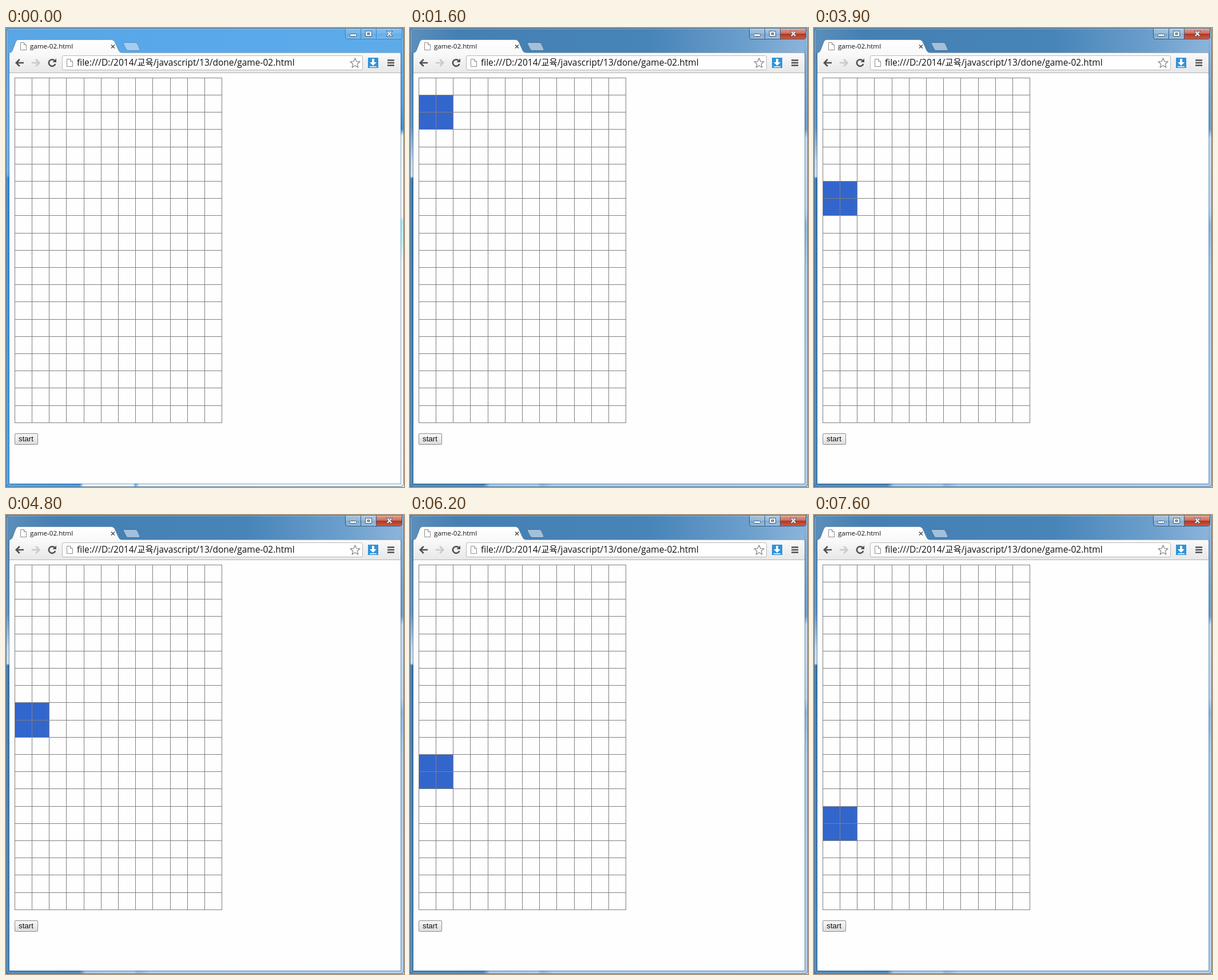
Animation of 696 by 804 pixels, one loop 8 s. Source, as an HTML page:

```html
<!DOCTYPE html>
<html lang="ko">
<head>
<meta charset="utf-8">
<title>Falling block</title>
<style>
html, body { margin: 0; width: 100%; height: 100%; overflow: hidden; background: #fff; }
svg { display: block; width: 696px; height: 804px; }
text { font-family: "Open Sans", "Noto Sans CJK KR", "Noto Sans CJK", sans-serif; fill: #111; white-space: pre; }
#active, #block { opacity: 0; }
.sharp { shape-rendering: crispEdges; }
</style>
</head>
<body>
<svg viewBox="0 0 696 804">
  <defs>
    <linearGradient id="topOff"><stop offset="0" stop-color="#5ba6e4"/><stop offset=".4" stop-color="#58a8ea"/><stop offset="1" stop-color="#5eabea"/></linearGradient>
    <linearGradient id="topOn"><stop offset="0" stop-color="#5c8fbb"/><stop offset=".12" stop-color="#4580b3"/><stop offset=".6" stop-color="#4784b8"/><stop offset=".85" stop-color="#6c9fcc"/><stop offset="1" stop-color="#8db5dc"/></linearGradient>
    <linearGradient id="leftOff" x2="0" y2="1"><stop offset="0" stop-color="#5ba8e8"/><stop offset=".28" stop-color="#66b0ea"/><stop offset=".29" stop-color="#2f86d6"/><stop offset="1" stop-color="#4a9ee4"/></linearGradient>
    <linearGradient id="leftOn" x2="0" y2="1"><stop offset="0" stop-color="#5088b8"/><stop offset=".17" stop-color="#5a8fbd"/><stop offset=".25" stop-color="#c3d6e8"/><stop offset=".285" stop-color="#cfdeec"/><stop offset=".29" stop-color="#3873a9"/><stop offset="1" stop-color="#4583b9"/></linearGradient>
    <linearGradient id="rightOff" x2="0" y2="1"><stop offset="0" stop-color="#5eabea"/><stop offset=".16" stop-color="#4a9de2"/><stop offset=".22" stop-color="#2e86d8"/><stop offset=".235" stop-color="#e9f5fd"/><stop offset=".41" stop-color="#f2f9fe"/><stop offset=".42" stop-color="#a5eafa"/><stop offset=".47" stop-color="#b9eefa"/><stop offset=".51" stop-color="#eff9fe"/><stop offset="1" stop-color="#eef6fc"/></linearGradient>
    <linearGradient id="rightOn" x2="0" y2="1"><stop offset="0" stop-color="#8db5dc"/><stop offset=".16" stop-color="#6b9fcc"/><stop offset=".22" stop-color="#659ac8"/><stop offset=".24" stop-color="#c1d8ee"/><stop offset=".4" stop-color="#b4d1ed"/><stop offset=".43" stop-color="#86b6df"/><stop offset=".53" stop-color="#a6c9ea"/><stop offset="1" stop-color="#a9cbec"/></linearGradient>
    <linearGradient id="footOff"><stop offset="0" stop-color="#4a9ee4"/><stop offset=".185" stop-color="#3d94df"/><stop offset=".195" stop-color="#eef7fd"/><stop offset=".32" stop-color="#eef7fd"/><stop offset=".325" stop-color="#55aae8"/><stop offset=".335" stop-color="#e6f3fc"/><stop offset="1" stop-color="#eef6fc"/></linearGradient>
    <linearGradient id="footOn"><stop offset="0" stop-color="#4583b9"/><stop offset=".185" stop-color="#4280b7"/><stop offset=".2" stop-color="#9fc4e8"/><stop offset=".32" stop-color="#a6c9ea"/><stop offset=".33" stop-color="#84b3de"/><stop offset=".36" stop-color="#a6c9ea"/><stop offset="1" stop-color="#a9cbec"/></linearGradient>
    <linearGradient id="bar" x2="0" y2="1"><stop offset="0" stop-color="#fafafa"/><stop offset="1" stop-color="#e7e7e7"/></linearGradient>
    <linearGradient id="tabFill" x2="0" y2="1"><stop offset="0" stop-color="#fff"/><stop offset="1" stop-color="#f9f9f9"/></linearGradient>
    <linearGradient id="glass" x2="0" y2="1"><stop offset="0" stop-color="#fff" stop-opacity=".38"/><stop offset=".48" stop-color="#fff" stop-opacity=".24"/><stop offset=".5" stop-color="#fff" stop-opacity=".06"/><stop offset="1" stop-color="#fff" stop-opacity=".24"/></linearGradient>
    <linearGradient id="red" x2="0" y2="1"><stop offset="0" stop-color="#dba197"/><stop offset=".47" stop-color="#cb6f60"/><stop offset=".5" stop-color="#b43420"/><stop offset="1" stop-color="#cf5a3c"/></linearGradient>
    <linearGradient id="btn" x2="0" y2="1"><stop offset="0" stop-color="#f7f7f7"/><stop offset=".4" stop-color="#eee"/><stop offset="1" stop-color="#dcdcdc"/></linearGradient>
    <g id="sheet" fill="#fff" stroke="#8c8c8c"><path d="M.5.5H6.5L10.5 4.5V13.5H.5Z"/><path d="M6.5.5V4.5H10.5" fill="#eee"/></g>
    <path id="newTab" d="M207 25.500H226Q229 25.500 230 28L234 37Q234.500 39.500 232 39.500H214Q211 39.500 210 37L205.500 28Q204.500 25.500 207 25.500Z"/>
    <path id="caption" d="M593.500 0V16Q593.500 19.500 597 19.500H688Q692.500 19.500 692.500 16V0M620.500 0V19M647.500 0V19" fill="none"/>
  </defs>

  <g id="idle">
    <rect width="696" height="80" fill="url(#topOff)"/>
    <rect y="43" width="7" height="761" fill="url(#leftOff)"/>
    <rect x="689" width="7" height="804" fill="url(#rightOff)"/>
    <rect y="797" width="696" height="7" fill="url(#footOff)"/>
    <use href="#newTab" fill="#a5cdf0" stroke="#5391c6"/>
    <rect x="594" y="1" width="98" height="18" fill="url(#glass)" opacity=".6"/>
    <use href="#caption" stroke="#4683b9"/>
  </g>
  <g id="active">
    <rect width="696" height="80" fill="url(#topOn)"/>
    <rect y="43" width="7" height="761" fill="url(#leftOn)"/>
    <rect x="689" width="7" height="804" fill="url(#rightOn)"/>
    <rect y="797" width="696" height="7" fill="url(#footOn)"/>
    <use href="#newTab" fill="#a3c0da" stroke="#41719c"/>
    <rect x="594" y="1" width="53" height="18" fill="url(#glass)"/>
    <path d="M648 1H692V16Q692 19 688 19H648Z" fill="url(#red)"/>
    <use href="#caption" stroke="#365b7e"/>
  </g>

  <!-- window edge -->
  <g fill="none">
    <rect x="1.500" y="1.500" width="693" height="801" rx="5" stroke="#fff" stroke-opacity=".4"/>
    <rect x=".5" y=".5" width="695" height="803" rx="6" stroke="#2b4a66" stroke-opacity=".75"/>
    <path d="M5.500 44V798.500H690.500V44" stroke="#38648c" stroke-opacity=".55"/>
  </g>

  <!-- caption icons -->
  <g fill="#fff" stroke="#4b5968">
    <rect x="601.500" y="10.500" width="11" height="4" rx="1"/>
    <path fill-rule="evenodd" d="M628.500 5.500H639.500V14.500H628.500ZM632 8.500H636V11.500H632Z"/>
    <path d="M665 5.500H668.500L670.500 8L672.500 5.500H676L672.500 9.800L676 14.500H672.500L670.500 11.800L668.500 14.500H665L668.500 9.800Z"/>
  </g>

  <!-- page and toolbar -->
  <rect x="6" y="78" width="684" height="720" fill="#fefefe"/>
  <path d="M6 79V46Q6 43 9 43H687Q690 43 690 46V79Z" fill="url(#bar)"/>
  <path class="sharp" d="M6 78.500H690" stroke="#b3b3b3"/>
  <path d="M6 43.500Q10 43 11.500 39L17 24.500Q18.500 20.500 22 20.500H184Q188 20.500 190 24L197 39.500Q199 43.500 204 43.500V45H6Z" fill="url(#tabFill)"/>
  <path d="M6 43.500Q10 43 11.500 39L17 24.500Q18.500 20.500 22 20.500H184Q188 20.500 190 24L197 39.500Q199 43.500 204 43.500H690" fill="none" stroke="#35587a" stroke-opacity=".45"/>
  <use href="#sheet" x="25" y="25"/>
  <text x="42" y="36" font-size="11.600">game-02.html</text>
  <path d="M184 29.500L190 35.500M190 29.500L184 35.500" stroke="#555" stroke-width="1.700"/>

  <g fill="none" stroke-width="2.600">
    <path id="back" d="M31 61H18.500M23.800 55L17.800 61L23.800 67" stroke="#505050"/>
    <path d="M45 61H57.500M52.200 55L58.200 61L52.200 67" stroke="#c9c9c9"/>
    <path d="M85 57.200A5.800 5.800 0 1 0 86.200 62.800" stroke="#505050"/>
  </g>
  <path d="M88 53.500V60H81.500Z" fill="#505050"/>

  <rect x="98.500" y="48.500" width="525" height="25" rx="2.500" fill="#fff" stroke="#b8b8b8"/>
  <use href="#sheet" x="106" y="54"/>
  <text id="path" x="124" y="66" font-size="15.500"></text>
  <path id="star" fill="#fff" stroke="#8a8a8a" stroke-width="1.300" stroke-linejoin="round"/>
  <rect x="633" y="52" width="18" height="18" fill="#2e93d9"/>
  <path d="M640 54H644V60H648L642 66L636 60H640ZM636 67H648V68.500H636Z" fill="#fff"/>
  <path d="M667 56.500H679M667 61H679M667 65.500H679" stroke="#505050" stroke-width="2.600"/>

  <!-- board -->
  <rect id="block" class="sharp" x="16" width="60" height="60" fill="#36c"/>
  <path id="grid" class="sharp" stroke="#808080" fill="none"/>

  <rect x="15.500" y="710.500" width="40" height="19" rx="1.500" fill="url(#btn)" stroke="#8c8c8c"/>
  <text x="22" y="724" font-size="13.333" style="font-family:'Liberation Sans',Arial,sans-serif">start</text>
</svg>
<script>
const LOOP = 8000, COLS = 12, ROWS = 20;
const $ = id => document.getElementById(id);
const lineX = i => Math.floor(15.3 + 30.2 * i);
const lineY = i => Math.floor(87.3 + 30.2 * i);

$('path').textContent = ['file:', '', '', 'D:', '2014', '교육', 'javascript', '13', 'done', 'game-02.html'].join('/');

let grid = '';
for (let i = 0; i <= COLS; i++) grid += `M${lineX(i) + .5} ${lineY(0)}V${lineY(ROWS) + 1}`;
for (let i = 0; i <= ROWS; i++) grid += `M${lineX(0)} ${lineY(i) + .5}H${lineX(COLS) + 1}`;
$('grid').setAttribute('d', grid);

const tips = Array.from({ length: 10 }, (_, i) => {
  const a = (i / 5 - .5) * Math.PI, r = i % 2 ? 4 : 9;
  return `${(610.5 + r * Math.cos(a)).toFixed(2)} ${(61.8 + r * Math.sin(a)).toFixed(2)}`;
});
$('star').setAttribute('d', `M${tips.join('L')}Z`);

// Each step is [time in ms, style], held until the next one.
function play(el, steps) {
  const frames = steps.map(([t, style]) => ({ ...style, offset: t / LOOP, easing: 'step-end' }));
  frames.push({ ...steps[steps.length - 1][1], offset: 1 });
  el.animate(frames, { duration: LOOP, iterations: Infinity });
}

play($('active'), [[0, { opacity: 0 }], [900, { opacity: .5 }], [1000, { opacity: 1 }]]);

const drop = row => ({ opacity: 1, transform: `translateY(${lineY(row) + 1}px)` });
const fall = [[0, { ...drop(1), opacity: 0 }]];
for (let row = 1; row <= 14; row++) {
  fall.push([Math.round(11.4 + 4.6 * row) * 100, drop(row)]);
}
play($('block'), fall);
</script>
</body>
</html>
```
